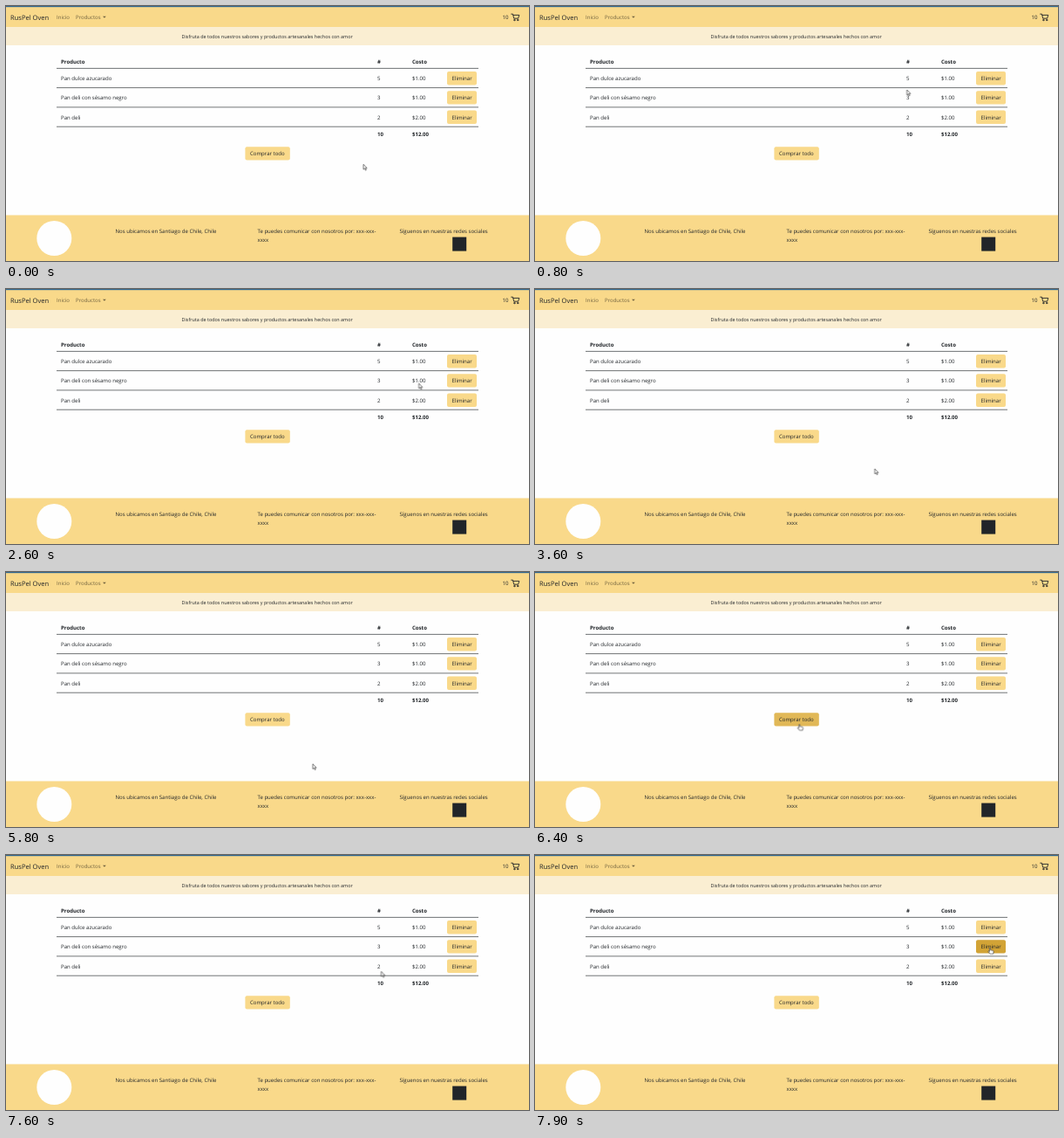
Recreate the animation shown at these times as an HTML page. Size 600 px wide and 292 px high, loop 8 s.

```html
<!DOCTYPE html>
<html lang="es">
<head>
<meta charset="utf-8">
<title>Carrito</title>
<style>
  :root { --honey: #f9d98a; --deep: #c8951f; --ink: #212529; }
  html, body { margin: 0; width: 100%; height: 100%; overflow: hidden; background: #fefefe; }
  svg { display: block; width: 100%; height: 100%; }
  text {
    font: 6.05px "Open Sans", "Noto Sans", sans-serif;
    fill: var(--ink);
    text-rendering: geometricPrecision;
    white-space: pre;
  }
  .brand { font-size: 7.55px; }
  .tagline { font-size: 5.45px; }
  .link { fill: #000; fill-opacity: .55; }
  .bold text, text.bold { font-weight: 700; }
  .bar, .btn { fill: var(--honey); }
  .rules { stroke: #4d5154; stroke-width: .8; }
  .icon { fill: none; stroke: var(--ink); stroke-width: .9; stroke-linejoin: round; stroke-linecap: round; }
  .pointer path { fill: #fff; stroke: #222; stroke-width: .6; stroke-linejoin: round; }

  .pointer, .arrow, .hand, .buy, .remove { animation: 8s linear infinite; }
  .pointer { animation-name: travel; }
  .arrow { animation-name: arrow; animation-timing-function: step-end; }
  .hand { animation-name: hand; animation-timing-function: step-end; }
  .buy { animation-name: buy; }
  .remove { animation-name: remove; }

  @keyframes travel {
    0%, 1.25%      { transform: translate(410px, 181.3px); }
    11.25%         { transform: translate(429px, 84px); }
    20%            { transform: translate(431.5px, 113.3px); }
    22.5%          { transform: translate(432px, 128px); }
    28.75%         { transform: translate(473px, 78px); }
    35%            { transform: translate(474px, 128px); }
    45%            { transform: translate(389.8px, 205.8px); }
    53.75%, 72.5%  { transform: translate(352px, 219.8px); }
    80%            { transform: translate(303.3px, 174.3px); }
    82.5%, 90%     { transform: translate(312px, 168.5px); }
    92.5%          { transform: translate(340px, 160px); }
    97.5%          { transform: translate(520px, 107px); }
    98.75%, 100%   { transform: translate(522px, 106.3px); }
  }
  @keyframes arrow {
    0%, 91.25% { opacity: 1; }
    79.1%, 97.1%, 100% { opacity: 0; }
  }
  @keyframes hand {
    0%, 91.25% { opacity: 0; }
    79.1%, 97.1%, 100% { opacity: 1; }
  }
  @keyframes buy {
    0%, 79.1%, 93.1%, 100% { fill: var(--honey); }
    81%, 91.25% { fill: var(--deep); }
  }
  @keyframes remove {
    0%, 97.1% { fill: var(--honey); }
    99.2%, 100% { fill: var(--deep); }
  }
</style>
</head>
<body>
<svg viewBox="0 0 600 292">
  <rect width="600" height="292" fill="#fefefe"/>

  <rect class="bar" width="600" height="24"/>
  <rect width="600" height="1.2" fill="#2f6690"/>
  <text class="brand" x="5" y="15.6">RusPel Oven</text>
  <text class="link" x="58" y="15.1">Inicio</text>
  <text class="link" x="80" y="15.1">Productos</text>
  <path class="link" d="M111 11.8h3.8l-1.9 2z"/>
  <text x="569.5" y="15.1">10</text>
  <g class="icon">
    <path d="M579.7 9.2h1.8l1.2 5h4.9l1.2-3.8h-6.9"/>
    <circle cx="583.3" cy="16.1" r=".7"/>
    <circle cx="587.1" cy="16.1" r=".7"/>
  </g>

  <rect y="24" width="600" height="21" fill="#faeed2"/>
  <text class="tagline" x="201.5" y="36.7">Disfruta de todos nuestros sabores y productos artesanales hechos con amor</text>

  <g class="bold">
    <text x="63" y="65.6">Producto</text>
    <text x="426" y="65.6">#</text>
    <text x="466" y="65.6">Costo</text>
    <text x="426" y="149.3">10</text>
    <text x="466" y="149.3">$12.00</text>
  </g>
  <path class="rules" d="M58 71.4h484M58 93.6h484M58 115.9h484M58 138.2h484"/>

  <g>
    <text x="63" y="85.1">Pan dulce azucarado</text>
    <text x="426" y="85.1">5</text>
    <text x="466" y="85.1">$1.00</text>
    <rect class="btn" x="506" y="75" width="34" height="15.4" rx="2"/>
    <text x="511.5" y="85.1">Eliminar</text>
  </g>
  <g>
    <text x="63" y="107.4">Pan deli con sésamo negro</text>
    <text x="426" y="107.4">3</text>
    <text x="466" y="107.4">$1.00</text>
    <rect class="btn remove" x="506" y="97.2" width="34" height="15.4" rx="2"/>
    <text x="511.5" y="107.4">Eliminar</text>
  </g>
  <g>
    <text x="63" y="129.7">Pan deli</text>
    <text x="426" y="129.7">2</text>
    <text x="466" y="129.7">$2.00</text>
    <rect class="btn" x="506" y="119.5" width="34" height="15.4" rx="2"/>
    <text x="511.5" y="129.7">Eliminar</text>
  </g>

  <rect class="btn buy" x="274.4" y="161.2" width="51.4" height="15.4" rx="2"/>
  <text x="280" y="171.3">Comprar todo</text>

  <rect class="bar" y="239.5" width="600" height="52.5"/>
  <circle cx="55.3" cy="266" r="20" fill="#fefefe"/>
  <text x="125.5" y="260.1">Nos ubicamos en Santiago de Chile, Chile</text>
  <text x="288.5" y="260.1">Te puedes comunicar con nosotros por: xxx-xxx-</text>
  <text x="288.5" y="269.7">xxxx</text>
  <text x="451.5" y="260.1">Síguenos en nuestras redes sociales</text>
  <rect x="512.2" y="264.6" width="16" height="16" fill="#212529"/>

  <g class="pointer">
    <path class="arrow" d="M0 0v5.8l1.4-1.2 1 2.2.9-.4-.9-2.1h1.8z"/>
    <path class="hand" d="M-.6 .5Q0-.5.6.5V2.6l3 .7q.7.3.6 1L3.7 7H.1L-2 4.6q-.2-.9.6-.8l.8.6z"/>
  </g>
</svg>
</body>
</html>
```
